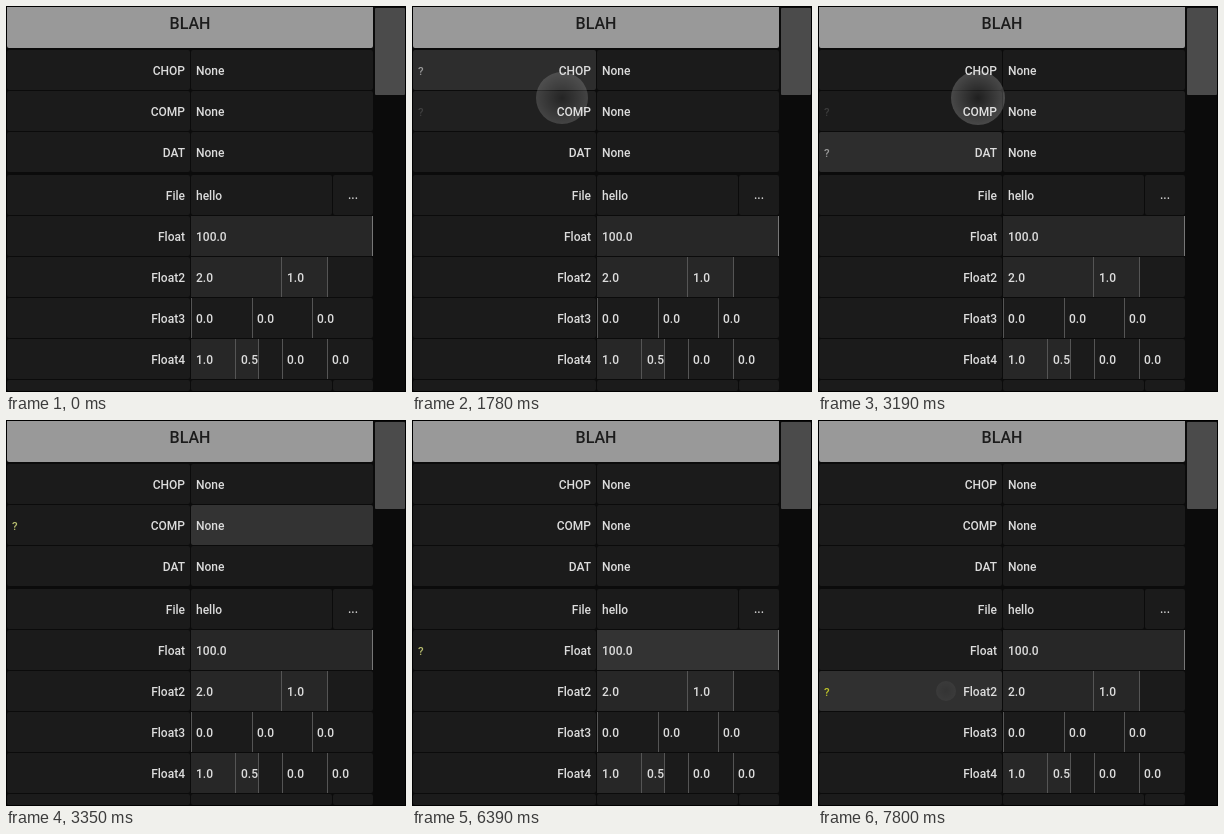
Write an HTML page with a canvas that moves like this. It is 400 px wide and 386 px high and loops after 8 s.

```html
<!DOCTYPE html>
<html lang="en">
<head>
<meta charset="utf-8">
<title>Parameter panel</title>
<style>
  html, body { margin: 0; width: 100%; height: 100%; overflow: hidden; background: #0b0b0b; }
  canvas { display: block; width: 400px; height: 386px; }
</style>
</head>
<body>
<canvas id="stage" width="400" height="386"></canvas>
<script>
const ctx = document.getElementById('stage').getContext('2d');
const LOOP = 8000, STEP = 80;
const FONT = 'Roboto, "Noto Sans", sans-serif';
const LEFT = 1, MID = 185, RIGHT = 367;

// fields: [text, fill ratio]; a ratio of null means a plain text field
const rows = [
  { name: 'CHOP', y: 44, fields: [['None', null]] },
  { name: 'COMP', y: 85, fields: [['None', null]] },
  { name: 'DAT', y: 126, fields: [['None', null]] },
  { name: 'File', y: 169, fields: [['hello', null]], button: true },
  { name: 'Float', y: 210, fields: [['100.0', 1]] },
  { name: 'Float2', y: 251, fields: [['2.0', 1], ['1.0', 0.5]] },
  { name: 'Float3', y: 292, fields: [['0.0', 0], ['0.0', 0], ['0.0', 0]] },
  { name: 'Float4', y: 333, fields: [['1.0', 1], ['0.5', 0.5], ['0.0', 0], ['0.0', 0]] },
  { name: '', y: 374, fields: [['', null]], button: true }
];

// Hover moves: where it leaves and enters, fade levels per step, ripple centre and radii
const moves = [
  { t: 990, from: null, to: 'CHOP:label', out: [0, 0, 0, 0], into: [0.2, 0.5, 0.8, 1], x: 132, y: 67, r: [25, 24, 10, 0] },
  { t: 1700, from: 'CHOP:label', to: 'COMP:label', out: [1, 0.75, 0.35, 0], into: [0, 0.2, 0.65, 1], x: 150, y: 92, r: [27, 26, 10, 0] },
  { t: 2490, from: 'COMP:label', to: 'DAT:label', out: [1, 0.5, 0], into: [0, 0.5, 1], x: 102, y: 145, r: [27, 18, 0] },
  { t: 3190, from: 'DAT:label', to: 'COMP:value', out: [0.75, 0.35, 0], into: [0.2, 0.65, 1], x: 160, y: 92, r: [27, 18, 0] },
  { t: 5060, from: 'COMP:value', to: null, out: [0.75, 0.35, 0], into: [0, 0, 0], x: 121, y: 190, r: [27, 18, 0] },
  { t: 6230, from: null, to: 'Float:value', out: [0, 0, 0], into: [0.2, 0.65, 1], x: 165, y: 229, r: [27, 18, 0] },
  { t: 7090, from: 'Float:value', to: 'Float:label', out: [0.75, 0.35, 0], into: [0.2, 0.65, 1], x: 155, y: 246, r: [27, 18, 0] },
  { t: 7640, from: 'Float:label', to: 'Float2:label', out: [0.75, 0.35, 0], into: [0.2, 0.55, 0.88], x: 131, y: 274, r: [27, 22, 10], drift: -1.5 }
];

const mix = (a, b, k) => Math.round(a + (b - a) * k);
const gray = v => `rgb(${v},${v},${v})`;

function box(x0, y0, x1, y1, color, radius = 2) {
  ctx.fillStyle = color;
  ctx.beginPath();
  ctx.roundRect(x0, y0, x1 - x0, y1 - y0, radius);
  ctx.fill();
}

function text(str, x, y, color = '#dcdcdc', align = 'left', size = 12) {
  ctx.font = `500 ${size}px ${FONT}`;
  ctx.textAlign = align;
  ctx.fillStyle = color;
  ctx.fillText(str, x, y);
}

function hoverAt(time) {
  const state = { levels: {}, entering: null, ripple: null };
  const move = moves.filter(m => time >= m.t).pop();
  if (!move) return state;
  const k = Math.min(move.r.length - 1, Math.floor((time - move.t) / STEP));
  if (move.from) state.levels[move.from] = move.out[k];
  if (move.to) state.levels[move.to] = move.into[k];
  // Full strength keeps its colour until the fade starts
  state.entering = move.out[k] === 1 ? move.from : move.to;
  const shift = (move.drift || 0) * k;
  state.ripple = { x: move.x + shift, y: move.y + shift, r: move.r[k] };
  return state;
}

function drawFields(row, bottom, base, level) {
  const n = row.fields.length, width = (RIGHT - MID) / n;
  row.fields.forEach(([label, fill], i) => {
    const x = Math.round(MID + i * width - 0.1);
    if (fill !== null) {
      const end = Math.floor(x + fill * (width - 1));
      if (fill) box(x, row.y, end, bottom, gray(mix(39, 51, level)), 0);
      box(end, row.y, end + 1, bottom, fill === 1 && n === 1 ? '#777' : '#555', 0);
    }
    text(label, x + 5, base);
  });
}

function drawRow(row, hover) {
  const labelLevel = hover.levels[row.name + ':label'] || 0;
  const valueLevel = hover.levels[row.name + ':value'] || 0;
  const bottom = Math.min(row.y + 40, 385), base = row.y + 25;
  const end = row.button ? 326 : RIGHT;

  box(LEFT, row.y, MID - 1, bottom, gray(mix(27, 51, labelLevel)));
  box(MID, row.y, end, bottom, gray(mix(27, 51, valueLevel)));
  if (row.button) {
    box(327, row.y, RIGHT, bottom, '#1b1b1b');
    if (row.name) text('...', 347, base - 1, '#dcdcdc', 'center');
  }
  drawFields(row, bottom, base, valueLevel);
  text(row.name, 179, base, '#dcdcdc', 'right');

  const level = Math.max(labelLevel, valueLevel);
  if (level) {
    const part = labelLevel > valueLevel ? 'label' : 'value';
    const active = hover.entering === row.name + ':' + part && level > 0.5;
    const rgb = !active ? '190,190,190' : part === 'label' ? '208,216,40' : '184,190,112';
    text('?', 6, base - 0.5, `rgba(${rgb},${level})`, 'left', 11.5);
  }
}

function drawRipple({ x, y, r }) {
  if (!r) return;
  const strength = r > 26 ? 0.2 : r > 20 ? 0.16 : r > 12 ? 0.12 : 0.05;
  const glow = ctx.createRadialGradient(x, y, 0, x, y, r);
  glow.addColorStop(0, 'rgba(255,255,255,0.02)');
  glow.addColorStop(1, `rgba(255,255,255,${strength})`);
  ctx.fillStyle = glow;
  ctx.beginPath();
  ctx.arc(x, y, r, 0, Math.PI * 2);
  ctx.fill();
}

function draw(time) {
  const hover = hoverAt(time);
  box(0, 0, 400, 386, '#0b0b0b', 0);
  box(LEFT, 1, RIGHT, 42, '#999', [0, 0, 2, 2]);
  text('BLAH', 184, 23, '#1c1c1c', 'center', 16);
  rows.forEach(row => drawRow(row, hover));
  box(369, 2, 399, 89, '#4b4b4b', 1);
  if (hover.ripple) drawRipple(hover.ripple);
  ctx.strokeStyle = '#000';
  ctx.lineWidth = 1;
  ctx.strokeRect(0.5, 0.5, 399, 385);
}

const start = performance.now();
function tick() {
  draw((performance.now() - start) % LOOP);
  requestAnimationFrame(tick);
}
tick();
</script>
</body>
</html>
```
